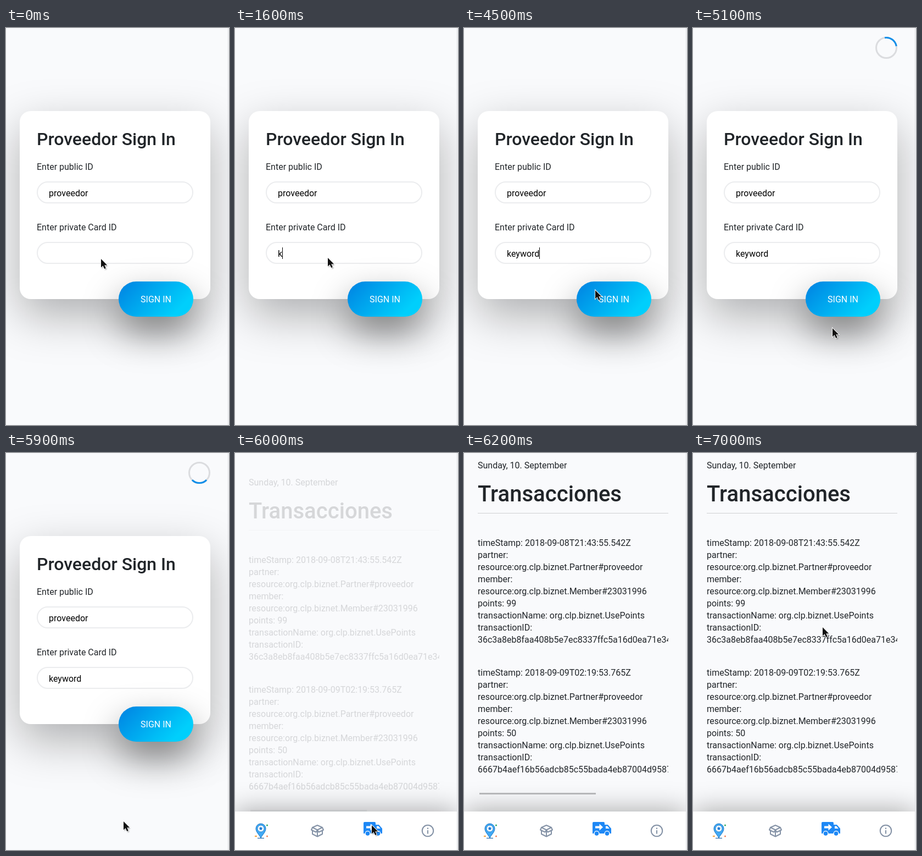
Animation of 406x722 px, one loop 8 s. Source, as an HTML page:

```html
<!DOCTYPE html>
<html lang="en">
<head>
<meta charset="utf-8">
<title>Sign in and transactions</title>
<style>
  html, body { margin: 0; width: 100%; height: 100%; overflow: hidden; background: #f9fafc; }
  svg { display: block; width: 100vw; height: 100vh; }
  text { font: 400 16px Roboto, sans-serif; fill: #212529; white-space: pre; }
  .h1 { font-size: 40px; font-weight: 500; }
  .h2 { font-size: 32px; font-weight: 500; }
  .value { fill: #000; }
  .field { fill: #fff; stroke: #ebecee; stroke-width: 2; }
  .line { fill: none; stroke: #8492a6; stroke-width: 2; stroke-linejoin: round; }
</style>
</head>
<body>
<svg viewBox="0 0 406 722" xmlns="http://www.w3.org/2000/svg">
  <defs>
    <filter id="blurCard" filterUnits="userSpaceOnUse" x="-200" y="-50" width="800" height="850"><feGaussianBlur stdDeviation="41"/></filter>
    <filter id="blurButton" filterUnits="userSpaceOnUse" x="0" y="300" width="600" height="500"><feGaussianBlur stdDeviation="33"/></filter>
    <filter id="blurNav" filterUnits="userSpaceOnUse" x="-150" y="500" width="710" height="400"><feGaussianBlur stdDeviation="25"/></filter>
    <filter id="blurTip" x="-50%" y="-50%" width="200%" height="200%"><feGaussianBlur stdDeviation=".8"/></filter>
    <linearGradient id="blue" gradientUnits="userSpaceOnUse" x1="223" y1="443" x2="323" y2="543">
      <stop offset=".08" stop-color="#0089e4"/><stop offset=".8" stop-color="#00cffc"/>
    </linearGradient>
    <clipPath id="column"><rect x="25" y="-100" width="347" height="900"/></clipPath>
    <path id="arrow" d="M0 0V15.5L3.6 12.2L6.2 18L8.8 16.9L6.3 11.2H11.2Z"/>
  </defs>
  <rect width="406" height="722" fill="#f9fafc"/>

  <g id="login">
    <rect x="25" y="181" width="347" height="342" rx="20" fill-opacity=".3" filter="url(#blurCard)"/>
    <rect x="25" y="151" width="347" height="342" rx="20" fill="#fff"/>
    <text class="h2" x="56" y="213">Proveedor Sign In</text>
    <text x="56" y="258">Enter public ID</text>
    <rect class="field" x="57" y="280" width="283" height="38" rx="19"/>
    <text class="value" x="78" y="306">proveedor</text>
    <text x="56" y="368">Enter private Card ID</text>
    <rect class="field" x="57" y="390" width="283" height="38" rx="19"/>
    <text class="value" id="typed" x="78" y="416"></text>
    <rect id="caret" y="399" width="1" height="21"/>
    <rect x="205" y="491" width="136" height="64" rx="32" fill-opacity=".45" filter="url(#blurButton)"/>
    <rect x="205" y="461" width="136" height="64" rx="32" fill="url(#blue)"/>
    <text x="273" y="499" text-anchor="middle" style="fill:#fff">SIGN IN</text>
    <g id="spinner" fill="none" stroke-width="3">
      <circle cx="352" cy="36" r="18.5" stroke="#dbdcdf"/>
      <path id="arc" d="M338.92 22.92A18.5 18.5 0 0 1 365.08 22.92" stroke="#108ee9"/>
    </g>
  </g>

  <g id="home">
    <g id="page">
      <text x="25" y="28">Sunday, 10. September</text>
      <text class="h1" x="25" y="88">Transacciones</text>
      <rect x="25" y="109" width="347" height="1" fill-opacity=".17"/>
      <g id="list" clip-path="url(#column)"></g>
    </g>
    <rect x="0" y="652" width="404" height="70" fill-opacity=".36" filter="url(#blurNav)"/>
    <rect id="bar" x="28" y="618" width="212" height="3" fill="#b5b6b8"/>
    <rect x="0" y="652" width="404" height="70" fill="#fff"/>

    <path d="M47 700C43 693 38 689 38 683A9 9 0 0 1 56 683C56 689 51 693 47 700Z" fill="#42a9f4" stroke="#1976c5"/>
    <circle cx="47" cy="683" r="6" fill="#fff" stroke="#1976c5" stroke-width=".8"/>
    <path id="star" fill="#1976d2"/>
    <path d="M41 700.5H53" stroke="#1f65a8" stroke-width="1.2"/>
    <circle cx="58.5" cy="677" r="1.6" fill="#35ab65"/>
    <path d="M36 697H40" stroke="#f7a94b" stroke-width="2.4"/>
    <circle cx="58.5" cy="697" r="1.5" fill="#f08055"/>

    <path class="line" d="M150 677L159 681L150 685.5L141 681ZM141 687V693L150 697.5L159 693V687M150 686V697M141 681L139 685.5L147.5 689.5L150 685.5L152.5 689.5L161 685.5L159 681"/>

    <g fill="#1e88f5">
      <path d="M236 671H254Q256 671 256 673V676H262L268 683V692H234V673Q234 671 236 671Z"/>
      <path d="M258 678.5H261.2L264.8 683H258Z" fill="#fff"/>
      <path d="M239 678.5H246.5V674.5L253 680.5L246.5 686.5V682.5H239Z" fill="#fff"/>
      <g stroke="#fff" stroke-width="1.3"><circle cx="241.5" cy="692" r="4.4"/><circle cx="260.5" cy="692" r="4.4"/></g>
    </g>

    <circle class="line" cx="351" cy="687" r="10.2"/>
    <path class="line" d="M351 686V692.5M351 681.5V684"/>
  </g>

  <g id="cursor">
    <use href="#arrow" x="1.5" y="1.8" fill-opacity=".45" filter="url(#blurTip)"/>
    <use href="#arrow" fill="#111" stroke="#fff" stroke-width="1.8" paint-order="stroke"/>
  </g>
  <rect x="404" width="1" height="722" fill="#dcdde0"/>
  <rect x="405" width="1" height="722" fill="#f9fafc"/>
</svg>
<script>
const LOOP = 8000, STEP = 100;
const $ = id => document.getElementById(id);
const set = (id, attrs) => { for (const k in attrs) $(id).setAttribute(k, attrs[k]); };
const show = (id, on) => set(id, { visibility: on ? 'visible' : 'hidden' });

// [time, x, y] of the pointer tip
const path = [
  [200, 173, 420], [300, 172, 419], [500, 169, 418], [4000, 169, 418],
  [4500, 239, 477], [4700, 266, 504], [4900, 266, 504], [5300, 241, 588],
  [5700, 211, 668], [5900, 214, 670], [6000, 249, 677], [6600, 249, 677],
  [6700, 285, 409], [6900, 245, 334], [7000, 236, 317]
];
// [time, letters typed]
const typing = [[1600, 1], [1800, 2], [2100, 3], [2800, 5], [3100, 6], [3400, 7]];

function pointer(t) {
  const i = path.findIndex(p => p[0] > t);
  if (i < 0) return path[path.length - 1].slice(1);
  if (i === 0) return path[0].slice(1);
  const [a, b] = [path[i - 1], path[i]];
  const k = (t - a[0]) / (b[0] - a[0]);
  return [1, 2].map(n => a[n] + (b[n] - a[n]) * k);
}

function addRecord(y, time, points, hash) {
  const lines = [
    'timeStamp: ' + time, 'partner:', 'resource:org.clp.biznet.Partner#proveedor',
    'member:', 'resource:org.clp.biznet.Member#23031996', 'points: ' + points,
    'transactionName: org.clp.biznet.UsePoints', 'transactionID:', hash
  ];
  lines.forEach((line, i) => {
    const el = document.createElementNS('http://www.w3.org/2000/svg', 'text');
    el.setAttribute('x', 25);
    el.setAttribute('y', y + 22 * i);
    el.textContent = line;
    $('list').append(el);
  });
}

function star(cx, cy, r) {
  return 'M' + Array.from({ length: 10 }, (_, i) => {
    const a = i * Math.PI / 5, d = i % 2 ? r * .45 : r;
    return (cx + d * Math.sin(a)).toFixed(2) + ' ' + (cy - d * Math.cos(a)).toFixed(2);
  }).join('L') + 'Z';
}

function render(now) {
  const t = Math.floor(now % LOOP / STEP) * STEP;
  const home = t >= 6000;
  $('login').style.display = home ? 'none' : '';
  $('home').style.display = home ? '' : 'none';

  if (home) {
    const p = Math.min(1, (t - 5950) / 250);
    const dy = 48.5 * (1 - p) ** 2;
    const move = `translate(0 ${dy.toFixed(1)})`;
    set('page', { transform: move, opacity: p ** 1.13 });
    set('bar', { transform: move, opacity: t < 6100 ? .4 : t < 6400 ? 1 : t < 6500 ? .5 : 0 });
  } else {
    const count = typing.reduce((n, [at, len]) => t >= at ? len : n, 0);
    $('typed').textContent = 'keyword'.slice(0, count);
    const width = count ? $('typed').getComputedTextLength() : 0;
    set('caret', { x: Math.round(78 + width) });
    show('caret', (t >= 700 && t < 1100) || (t >= 1600 && t < 3900) || (t >= 4400 && t < 4900));
    show('spinner', t >= 4900);
    set('arc', { transform: `rotate(${(t - 4900) * .18} 352 36)` });
  }

  const [x, y] = pointer(t);
  set('cursor', { transform: `translate(${Math.round(x)} ${Math.round(y)})` });
  show('cursor', t < 6200 || t >= 6700);
}

addRecord(169, '2018-09-08T21:43:55.542Z', 99, '36c3a8eb8faa408b5e7ec8337ffc5a16d0ea71e34b7');
addRecord(405, '2018-09-09T02:19:53.765Z', 50, '6667b4aef16b56adcb85c55bada4eb87004d9587c1');
set('star', { d: star(47, 683, 4) });

const start = performance.now();
function tick() {
  render(performance.now() - start);
  requestAnimationFrame(tick);
}
tick();
</script>
</body>
</html>
```
